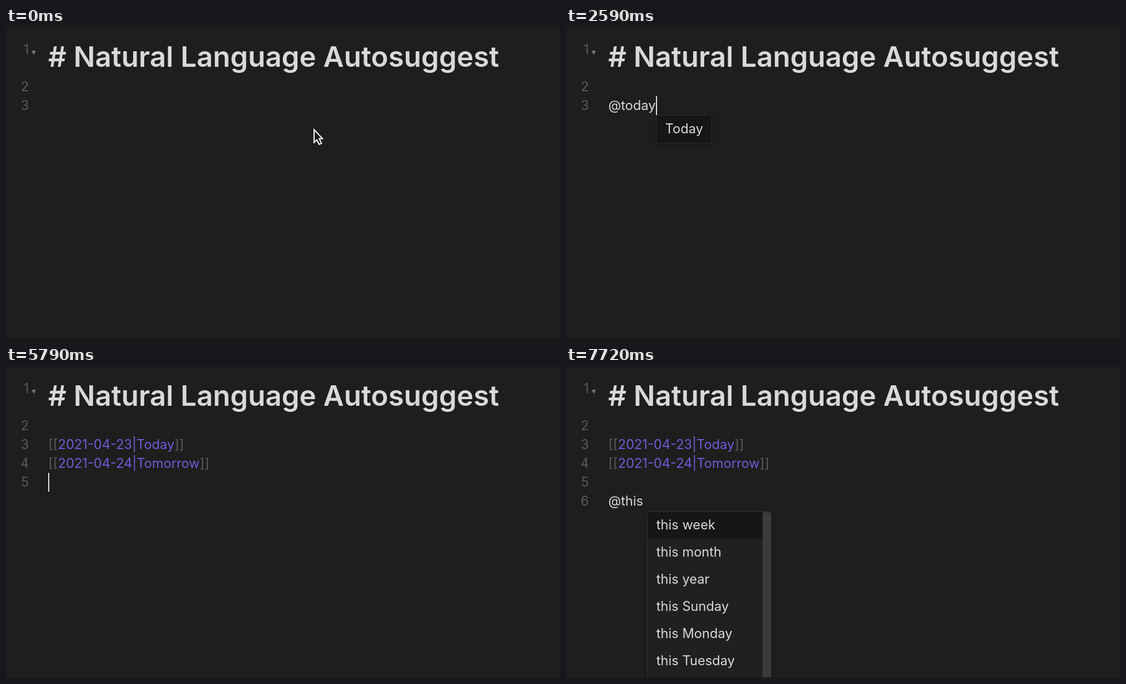
An HTML page that plays this animation: 998 px wide and 561 px high, repeating every 8000 ms.

```html
<!DOCTYPE html>
<html lang="en">
<head>
<meta charset="utf-8">
<title>Natural Language Autosuggest</title>
<style>
  html, body { margin: 0; width: 100%; height: 100%; overflow: hidden; background: #1e1e1e; }
  #stage {
    position: relative; width: 998px; height: 561px; overflow: hidden;
    font: 23.7px/34px Inter, sans-serif; font-optical-sizing: none;
    color: #d9d9d9; white-space: pre;
  }
  #stage::after { content: ""; position: absolute; inset: 560px 0 0; background: #141414; }
  h1 {
    position: absolute; left: 75.9px; top: 21px; margin: 0;
    font-size: 51.1px; font-weight: 600; line-height: 60px;
  }
  .num { position: absolute; left: 0; width: 41.3px; text-align: right; color: #5a5a5a; }
  .line { position: absolute; left: 76.2px; }
  .mark { color: #5c5c5c; }
  .link { color: #705cd8; }
  .typo { text-decoration: underline wavy #b5262c 1.5px; text-underline-offset: 2px; text-decoration-skip-ink: none; }
  .anchor { position: absolute; left: 100%; top: 0; }
  .caret { position: absolute; left: 0; top: 0; width: 2px; height: 34px; background: #e4e4e4; }
  .popup {
    position: absolute; left: 0; top: 34.3px; overflow: hidden;
    background: #202020; border: 1px solid #303030; border-radius: 4px;
    box-shadow: 0 3px 10px rgba(0, 0, 0, .22);
  }
  .popup div { padding: 0 15px 1.6px 16px; line-height: 47.5px; }
  .popup div:first-child { background: #161616; }
  .long { width: 222px; }
  .long div { margin-right: 15px; }
  .long i { position: absolute; right: 0; top: 0; width: 15px; height: 100%; background: #3b3b3b; border-radius: 6px 6px 0 0; }
  svg { position: absolute; left: 0; top: 0; }
</style>
</head>
<body>
<div id="stage">
  <h1># Natural Language Autosuggest</h1>
  <div class="num" style="top:22px">1</div>
  <svg width="998" height="561">
    <path d="M46 41h8l-4 7.5z" fill="#777"/>
    <path id="pointer" d="M555 183.3V206.5L560 201.7L564 210L568.3 208.2L564.4 199.6H570.2Z"
      fill="#191919" stroke="#fff" stroke-width="2"/>
  </svg>
  <div id="doc"></div>
</div>
<script>
const LOOP = 8000, BLINK = 500, FIRST_BLINK = -950;

// [time in ms, key]; "\n" accepts a suggestion or starts a new line
const keys = [
  [1350, "@"], [2060, "t"], [2180, "o"], [2300, "d"], [2420, "a"], [2540, "y"],
  [3010, "\n"], [3200, "\n"],
  [3490, "@"], [4000, "t"], [4050, "o"], [4190, "m"], [4320, "o"],
  [4840, "\n"], [5790, "\n"], [6060, "\n"],
  [6220, "@"], [6860, "t"], [7010, "h"], [7090, "i"], [7170, "s"], [7220, " "]
];
const dates = { Today: "2021-04-23", Tomorrow: "2021-04-24" };
const days = ["Today", "Yesterday", "Tomorrow"];
const spans = ["week", "month", "year", "Sunday", "Monday", "Tuesday", "Wednesday"];

const doc = document.getElementById("doc");
const pointer = document.getElementById("pointer");
let shown = "";

function suggest(line) {
  if (line[0] !== "@") return [];
  const query = line.slice(1);
  if (query.startsWith("this")) return spans.map(s => "this " + s);
  return days.filter(d => d.toLowerCase().startsWith(query));
}

function press(lines, key) {
  const last = lines.length - 1, [pick] = suggest(lines[last]);
  if (key !== "\n") lines[last] += key;
  else if (pick) lines[last] = `[[${dates[pick]}|${pick}]]`;
  else lines.push("");
  return lines;
}

function popup(items) {
  if (!items.length) return "";
  const long = items.length > 3;
  return `<div class="popup${long ? " long" : ""}">` +
    items.map(s => `<div>${s}</div>`).join("") + (long ? "<i></i>" : "") + "</div>";
}

const format = line => line
  .replace(/^\[\[(.*)\]\]$/, '<span class="mark">[[</span><span class="link">$1</span><span class="mark">]]</span>')
  .replace(/^@(tomo)$/, '@<span class="typo">$1</span>');

function render(lines, caretOn) {
  return lines.map((line, i) => {
    const top = `style="top:${88.9 + 34.1 * i}px"`;
    const tail = i < lines.length - 1 ? "" :
      `<span class="anchor">${popup(suggest(line))}${caretOn ? '<span class="caret"></span>' : ""}</span>`;
    return `<div class="num" ${top}>${i + 2}</div>` +
      `<div class="line" ${top}>${format(line)}${tail}</div>`;
  }).join("");
}

function draw(now) {
  const t = now % LOOP;
  const done = keys.filter(([at]) => at <= t);
  const since = t - (done.length ? done[done.length - 1][0] : FIRST_BLINK);
  const lines = done.reduce((all, [, key]) => press(all, key), ["", ""]);
  const html = render(lines, Math.floor(since / BLINK) % 2 === 0);
  if (html !== shown) doc.innerHTML = shown = html;
  pointer.style.display = done.length ? "none" : "";
}

const start = performance.now();
function tick() {
  draw(performance.now() - start);
  requestAnimationFrame(tick);
}
tick();
</script>
</body>
</html>
```
